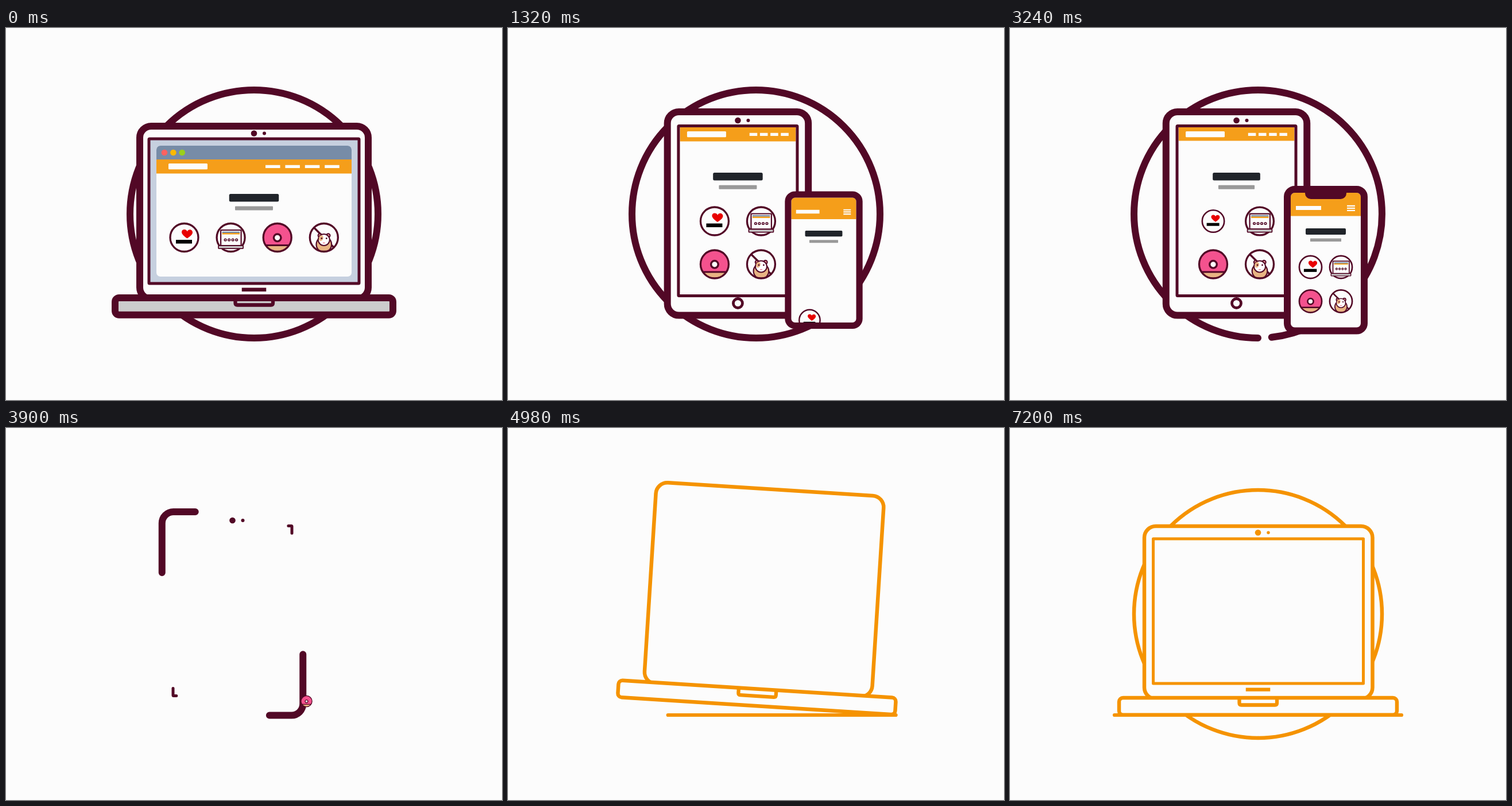
An HTML page with a canvas that plays this animation: 864 px wide and 648 px high, repeating every 8 s.

```html
<!DOCTYPE html>
<html lang="en">
<head>
<meta charset="utf-8">
<title>Responsive devices</title>
<style>
html, body { margin: 0; width: 100%; height: 100%; overflow: hidden; background: #fcfcfc }
canvas { display: block }
</style>
</head>
<body>
<canvas id="stage" width="864" height="648"></canvas>
<script>
const c = document.getElementById('stage').getContext('2d');
const BG = '#fcfcfc', DARK = '#520826', ORANGE = '#f59300', HEADER = '#f59e1a';
const TAN = '#e8b483', GREY = '#cccccc', TAU = Math.PI * 2;
let now = 0;

// Timing and easing
const ramp = (start, dur) => Math.min(1, Math.max(0, (now - start) / dur));
const mix = (a, b, k) => a + (b - a) * k;
const backIn = (t, s) => t * t * ((s + 1) * t - s);
const backOut = (t, s) => 1 - backIn(1 - t, s);
const inOut = t => t < .5 ? 4 * t ** 3 : 1 - (2 - 2 * t) ** 3 / 2;
const elastic = (t, p) => t <= 0 ? 0 : t >= 1 ? 1
  : 1 + 2 ** (-10 * t) * Math.sin((t - p / 4) * TAU / p);

// Drawing helpers
function paint(fill, line, width) {
  if (fill) { c.fillStyle = fill; c.fill(); }
  if (line) { c.strokeStyle = line; c.lineWidth = width; c.stroke(); }
}
function box(x, y, w, h, r, fill, line, width) {
  if (w <= 0 || h <= 0) return;
  c.beginPath();
  c.roundRect(x, y, w, h, r);
  paint(fill, line, width);
}
function bar(cx, y, w, h, r, fill) { box(cx - w / 2, y, w, h, r, fill); }
function disc(x, y, r, fill, line, width) {
  if (r <= 0) return;
  c.beginPath();
  c.arc(x, y, r, 0, TAU);
  paint(fill, line, width);
}
function path(points, line, width) {
  c.beginPath();
  for (const [x, y] of points) c.lineTo(x, y);
  paint(null, line, width);
}
function scaled(x, y, sx, sy, draw) {
  if (sx <= 0 || sy <= 0) return;
  c.save();
  c.translate(x, y);
  c.scale(sx, sy);
  c.translate(-x, -y);
  draw();
  c.restore();
}
// Outline that closes up into two opposite pieces, centred on `mid`
function outline(x, y, w, h, r, width, keep, mid) {
  if (keep <= 0) return;
  const half = w + h - (4 - Math.PI) * r, len = half * keep;
  c.save();
  if (keep < 1) {
    c.setLineDash([len, half - len]);
    c.lineDashOffset = len / 2 - mid;
  }
  box(x, y, w, h, r, null, DARK, width);
  c.restore();
}
function ring(keep, color, width) {
  if (keep <= 0) return;
  c.beginPath();
  c.arc(432, 324, 216, Math.PI / 2, Math.PI / 2 + TAU * keep);
  paint(null, color, width);
}

// Round badges, drawn around the origin
const badges = [
  () => {
    disc(0, 0, 24.5, BG, DARK, 3.3);
    c.beginPath();
    c.moveTo(5, 1.5);
    c.bezierCurveTo(-1, -3, -4.5, -6, -4.5, -9.5);
    c.bezierCurveTo(-4.5, -15, 3.5, -15.5, 5.2, -10.5);
    c.bezierCurveTo(7, -15.5, 14.5, -14.5, 14.5, -9);
    c.bezierCurveTo(14.5, -5, 10, -2, 5, 1.5);
    paint('#e80000');
    box(-14.5, 4, 28, 6.5, 0, '#000');
  },
  () => {
    disc(0, 0, 24.5, BG, DARK, 3.3);
    box(-17.5, -13, 35.5, 27, 1, BG, DARK, 2.2);
    box(-15, -10.5, 30.5, 2.5, 0, '#778ca7');
    box(-15, -8, 30.5, 2.5, 0, HEADER);
    for (let i = 0; i < 4; i++) disc(-9.5 + i * 6.5, 4, 1.8, null, DARK, 1.6);
    box(-21.5, 14, 43, 5.2, 1, GREY, DARK, 1.8);
  },
  () => {
    disc(0, 0, 24.5, '#f4528e');
    c.save();
    c.clip();
    box(-25, 13, 50, 13, 0, TAN);
    box(-25, 12, 50, 3, 0, DARK);
    c.restore();
    disc(0, 0, 24.5, null, DARK, 3.3);
    disc(0, .3, 6.3, BG, DARK, 3.4);
  },
  () => {
    disc(0, 0, 24.5, BG);
    path([[-17, -17], [17, 17]], DARK, 3.3);
    c.save();
    disc(0, 0, 24.5);
    c.clip();
    disc(0, 12, 13.3, TAN, DARK, 2.2);
    c.restore();
    disc(0, 0, 24.5, null, DARK, 3.3);
    for (const x of [-7, 7.5]) disc(x, -3.5, 3.2, '#f09a9a', DARK, 2);
    disc(0, 4, 10, '#fff', DARK, 2);
    c.beginPath();
    c.ellipse(-5, 1, 3.8, 5, .3, 0, TAU);
    paint(TAN);
    for (const x of [-4, 4.5]) disc(x, 1.5, 1.4, DARK);
    box(-2, 8.5, 4, 1.8, .9, '#f08aa0');
  }
];
function badge(i, x, y, s) {
  if (s <= 0) return;
  c.save();
  c.translate(x, y);
  c.scale(s, s);
  badges[i]();
  c.restore();
}

// The laptop whose lid turns into a tablet
function screenDevice() {
  const k = ramp(300, 660);
  const m = backOut(k, 1.2), top = backOut(k, 4.4);
  const cx = mix(432, 394.5, elastic(ramp(1170, 1100), .75));
  const left = 1 - inOut(ramp(3130, 500));
  const half = mix(199, 122.75, m), y0 = mix(171, 146, top), y1 = mix(472, 500.5, m);
  const lidKeep = 1 - inOut(ramp(3500, 675)), glassKeep = 1 - inOut(ramp(3370, 671));

  if (lidKeep === 1) box(cx - half, y0, half * 2, y1 - y0, 20, BG);
  outline(cx - half, y0, half * 2, y1 - y0, 20, 12, lidKeep, -40);

  const gh = mix(183, 103.5, m), g0 = mix(193, 170.5, m), g1 = mix(445, 466.5, m);
  if (left > 0) {
    const flat = Math.max(0, 1 - m);
    box(cx - gh, g0, gh * 2, g1 - g0, 0, m < 1 && k < 1 ? '#c6d0df' : BG);
    const wh = mix(170, 101, m), w0 = mix(205, 173, m), w1 = mix(433, 464, m);
    c.save();
    c.beginPath();
    c.roundRect(cx - wh, w0, wh * 2, w1 - w0, 7 * flat);
    paint(BG);
    c.clip();
    const tb = 24 * flat, hy = w0 + tb;
    box(cx - wh, w0, wh * 2, tb + .5, 0, '#778ca7');
    ['#ff6260', '#fcb900', '#9ad01c'].forEach((color, i) =>
      disc(cx - wh + 14 + i * 15.4, w0 + tb / 2, 5.3 * flat, color));
    c.save();
    c.beginPath();
    c.rect(cx - wh, hy, wh * 2, 24.5 * left);
    paint(HEADER);
    c.clip();
    box(cx - mix(149, 88.5, m), hy + 7, 68, 10.3, 1.5, BG);
    for (let i = 0; i < 4; i++)
      box(cx + mix(20 + i * 34.4, 20.3 + i * 18.2, m), hy + 9.7, mix(25.5, 13.5, m), 5.2, 0, BG);
    c.restore();
    c.restore();
    bar(cx, mix(289, 252, m), 86.5 * left, 13.5, 2.5, '#20242a');
    bar(cx, mix(310.5, 273.7, m), 66 * left, 7, 1, '#999');
    for (let i = 0; i < 4; i++) {
      const x = mix(-121.5 + i * 81.1, i % 2 ? 40.5 : -40.5, m);
      badge(i, cx + x, mix(365, i < 2 ? 336.5 : 411.5, m), 1 - inOut(ramp(3120 + i * 90, 320)));
    }
  }
  outline(cx - gh, g0, gh * 2, g1 - g0, 1, 5, glassKeep, 209);

  const cam = 1 - inOut(ramp(3990, 190)), cy = mix(183.5, 161, m);
  disc(cx, cy, 5.3 * cam, DARK);
  disc(cx + 18, cy, 3 * cam, DARK);
  bar(cx, mix(452.5, 476, m), 42.5 * (1 - ramp(300, 250)), 6.5, 0, DARK);
  const home = backOut(ramp(600, 300), 1.7) * (1 - inOut(ramp(3250, 350)));
  scaled(cx, 479.5, home, home, () => disc(cx, 479.5, 8, BG, DARK, 4.8));

  const s = 1 - backIn(ramp(180, 440), 1.1);
  scaled(432, 485, s, s, () => base(DARK, 12, GREY));
}

function base(color, width, fill) {
  box(190, 470, 484, 29.7, 7, fill, color, width);
  c.beginPath();
  c.moveTo(399.5, 471);
  c.lineTo(399.5, 479);
  c.quadraticCurveTo(399.5, 482.5, 403, 482.5);
  c.lineTo(461.5, 482.5);
  c.quadraticCurveTo(465, 482.5, 465, 479);
  c.lineTo(465, 471);
  paint(null, color, 6.3);
}

function phone() {
  const grow = elastic(ramp(858, 1250), .39);
  const body = 1 - backIn(ramp(3400, 430), 1.2);
  const spots = i => [i % 2 ? 576.5 : 523.5, i < 2 ? 416.5 : 476];
  const exitOrder = [0, 1, 3, 2];
  const icons = () => {
    for (let i = 0; i < 4; i++) {
      const [x, y] = spots(i);
      const rise = 200 * (1 - ramp(1205 + i * 185, 735)) ** 4;
      badge(i, x, y + rise, .8 * (1 - inOut(ramp(3300 + exitOrder[i] * 150, 300))));
    }
  };
  scaled(550, 404, grow * body, grow * body, () => {
    box(483, 281, 134, 246.5, 13, BG);
    c.save();
    c.beginPath();
    c.roundRect(489, 287, 122, 234.5, 7);
    c.clip();
    box(488, 286, 124, 41.5, 0, HEADER);
    box(498, 310, 44, 7, 0, BG);
    for (let i = 0; i < 3; i++) box(587, 308.7 + i * 4, 14, 2.3, 0, BG);
    bar(550, 349, 70, 11, 2, '#20242a');
    bar(550, 366.5, 54, 5.5, .5, '#999');
    const drop = 12 * (1 - inOut(ramp(1800, 250)));
    box(514, 270 - drop, 72, 28, 10, DARK);
    if (now < 3120) icons();
    c.restore();
    box(483, 281, 134, 246.5, 13, null, DARK, 12);
  });
  if (now >= 3120) icons();
}

// The line-art laptop that pops up, tips and lands
function lineLaptop() {
  ring(ramp(6280, 920) ** 3.5, ORANGE, 6.5);
  const ground = 1 - (1 - ramp(4760, 540)) ** 3;
  if (ground > 0) path([[651 - 469 * ground, 500], [651 + 31 * ground, 500]], ORANGE, 6.2);

  const tilt = 3.7 * Math.sin(Math.PI * Math.sqrt(ramp(4740, 760)));
  c.save();
  c.translate(677, 500);
  c.rotate(tilt * Math.PI / 180);
  c.translate(-677, -500);
  const h = 301 * elastic(ramp(4750, 900), .55);
  box(234, 472 - h, 397.5, h, Math.min(20, h / 2), BG, ORANGE, 6.5);
  const s = backOut(ramp(4200, 420), 1.25);
  scaled(432, 485, s, s, () => base(ORANGE, 6.5, BG));
  c.restore();

  const gh = 252 * inOut(ramp(5545, 160)), gw = 366 * backOut(ramp(5758, 275), 3);
  if (gh > 0) box(432.5 - gw / 2, 319 - gh / 2, Math.max(gw, 6.5), gh, 0, null, ORANGE, 5);
  disc(432, 182.3, 5.3 * elastic(ramp(6170, 700), .35), ORANGE);
  disc(450, 182.3, 2.7 * elastic(ramp(6230, 700), .35), ORANGE);
  bar(432, 452.5, 42.5 * elastic(ramp(6290, 660), .39), 6.3, 0, ORANGE);
}

function frame(ms) {
  now = ms % 8000;
  c.fillStyle = BG;
  c.fillRect(0, 0, 864, 648);
  c.lineCap = c.lineJoin = 'round';
  if (now < 4190) {
    ring(1 - inOut(ramp(3120, 740)), DARK, 12);
    screenDevice();
    phone();
  } else {
    lineLaptop();
  }
}

const begin = performance.now();
function tick() {
  frame(performance.now() - begin);
  requestAnimationFrame(tick);
}
tick();
</script>
</body>
</html>
```
